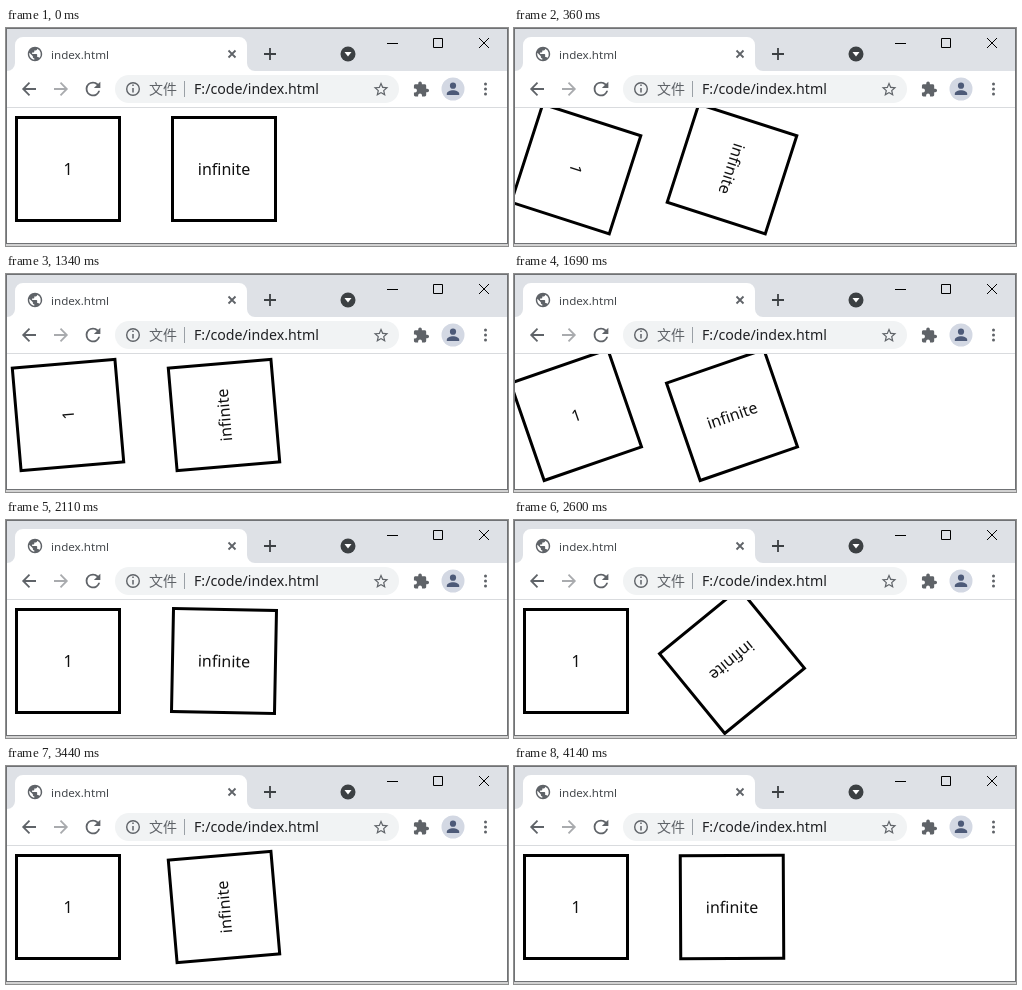
Write an HTML page that moves like this. It is 502 px wide and 218 px high and loops after 4210 ms.

```html
<!DOCTYPE html>
<html lang="zh">
<meta charset="utf-8">
<title>index.html</title>
<style>
  html, body { margin: 0; width: 100%; height: 100%; overflow: hidden; background: #fff; }
  svg { display: block; width: 502px; height: 218px; font-family: "Noto Sans", "Open Sans", sans-serif; }
  .line { fill: none; stroke: #5f6368; stroke-width: 1.8; }
  .thin { fill: none; stroke: #000; stroke-width: 1; }
  .icon { fill: #5f6368; }
  .box rect { fill: #fff; stroke: #000; stroke-width: 3; }
  .box text { font-size: 16px; text-anchor: middle; fill: #111; }
</style>
<svg viewBox="0 0 502 218">
  <defs>
    <clipPath id="page"><rect x="1" y="80" width="500" height="135"/></clipPath>
  </defs>
  <rect width="502" height="218" fill="#d2d2d2"/>
  <rect x=".5" y=".5" width="501" height="215" fill="#fff" stroke="#707275"/>

  <!-- tab strip -->
  <path d="M1 1H501V43H1z" fill="#dee1e6"/>
  <path d="M1 43a8 8 0 0 0 8-8V17a8 8 0 0 1 8-8H233a8 8 0 0 1 8 8V35a8 8 0 0 0 8 8z" fill="#fff"/>
  <path class="icon" transform="translate(29 26) scale(.72) translate(-12 -12)" d="M12 2C6.48 2 2 6.48 2 12s4.48 10 10 10 10-4.48 10-10S17.52 2 12 2zm-1 17.93c-3.95-.49-7-3.85-7-7.93 0-.62.08-1.21.21-1.79L9 15v1c0 1.1.9 2 2 2zm6.9-2.54A2 2 0 0 0 16 16h-1v-3c0-.55-.45-1-1-1H8v-2h2c.55 0 1-.45 1-1V7h2c1.1 0 2-.9 2-2v-.41a8 8 0 0 1 2.9 12.8z"/>
  <text x="45" y="30.5" font-size="11.6" fill="#45494d">index.html</text>
  <path class="line" stroke-width="1.6" d="M222.5 22.5l7 7m0-7l-7 7"/>
  <path class="line" style="stroke:#3c4043" d="M258 26h12m-6-6v12"/>
  <circle cx="342" cy="26" r="7.5" fill="#3c4043"/>
  <path d="M338.5 24h7l-3.5 4.5z" fill="#fff"/>
  <path class="thin" d="M381 15.5h11M427.5 10.5h9v9h-9zM473 10l10 10m0-10l-10 10"/>

  <!-- toolbar -->
  <path class="line" d="M30 61H17.5m6-6.3l-6.3 6.3 6.3 6.3"/>
  <path class="line" style="stroke:#a9abae" d="M48 61h12.5m-6-6.3l6.3 6.3-6.3 6.3"/>
  <path class="icon" transform="translate(87 61) scale(.92) translate(-12 -12)" d="M17.65 6.35A7.96 7.96 0 0 0 12 4a8 8 0 1 0 7.73 10h-2.08A6 6 0 1 1 12 6c1.66 0 3.14.69 4.22 1.78L13 11h7V4z"/>
  <rect x="109" y="47" width="284" height="28" rx="14" fill="#f1f3f4"/>
  <circle class="line" style="stroke-width:1.4" cx="127" cy="61" r="6.3"/>
  <path class="line" style="stroke-width:1.5" d="M127 60v4.5m0-8v1.6"/>
  <text x="143" y="66" font-size="14" fill="#5f6368" style="font-family:'Noto Sans CJK SC','Noto Sans CJK',sans-serif">文件</text>
  <path d="M178.5 53v16" stroke="#9aa0a6"/>
  <text x="188" y="66" font-size="14.2" fill="#202124">F:/code/index.html</text>
  <path class="icon" transform="translate(375 61) scale(.74) translate(-12 -11.5)" d="M22 9.24l-7.19-.62L12 2 9.19 8.63 2 9.24l5.46 4.73L5.82 21 12 17.27 18.18 21l-1.63-7.03zM12 15.4l-3.76 2.27 1-4.28-3.32-2.88 4.38-.38L12 6.1l1.71 4.04 4.38.38-3.32 2.88 1 4.28z"/>
  <path class="icon" transform="translate(415.5 61) scale(.72) translate(-12.5 -11.5)" d="M20.5 11H19V7c0-1.1-.9-2-2-2h-4V3.5a2.5 2.5 0 0 0-5 0V5H4c-1.1 0-2 .9-2 2v3.8h1.5a2.7 2.7 0 0 1 0 5.4H2V20c0 1.1.9 2 2 2h3.8v-1.5a2.7 2.7 0 0 1 5.4 0V22H17c1.1 0 2-.9 2-2v-4h1.5a2.5 2.5 0 0 0 0-5z"/>
  <circle cx="447" cy="61" r="11.5" fill="#d3d8e3"/>
  <g fill="#4d5a78">
    <circle cx="447" cy="57.7" r="3.1"/>
    <path d="M440.8 67v-1.3c0-2.2 3.4-3.5 6.2-3.5s6.2 1.3 6.2 3.5V67z"/>
  </g>
  <g class="icon">
    <circle cx="479.5" cy="56" r="1.5"/><circle cx="479.5" cy="61" r="1.5"/><circle cx="479.5" cy="66" r="1.5"/>
  </g>
  <path d="M1 79.5H501" stroke="#d9dbde"/>

  <g clip-path="url(#page)">
    <g class="box" id="once"><rect x="10.5" y="89.5" width="103" height="103"/><text x="62" y="147">1</text></g>
    <g class="box" id="endless"><rect x="166.5" y="89.5" width="103" height="103"/><text x="218" y="147">infinite</text></g>
  </g>
</svg>
<script>
  const LOOP = 4210, STEP = LOOP / 60, HALF_TURN = LOOP / 4, LEAD = 14;
  const once = document.getElementById('once');
  const endless = document.getElementById('endless');

  // CSS "ease": cubic-bezier(.25, .1, .25, 1)
  function ease(x) {
    let lo = 0, hi = 1, s = 0.5;
    for (let i = 0; i < 24; i++) {
      s = (lo + hi) / 2;
      if (0.75 * s * (1 - s) + s ** 3 < x) lo = s; else hi = s;
    }
    return 0.3 * s * (1 - s) ** 2 + 3 * s * s * (1 - s) + s ** 3;
  }

  const rotate = (box, angle, cx) => box.setAttribute('transform', `rotate(${angle} ${cx} 141)`);

  // Each turn is two eased half turns; the screen updates in fixed steps.
  function draw(time) {
    const step = Math.floor((time % LOOP + 1) / STEP) % 60;
    const halves = step ? (step * STEP + LEAD) / HALF_TURN : 0;
    const angle = 180 * (Math.floor(halves) + ease(halves % 1));
    rotate(once, halves < 2 ? angle : 0, 62);
    rotate(endless, angle, 218);
  }

  const start = performance.now();
  function tick() {
    draw(performance.now() - start);
    requestAnimationFrame(tick);
  }
  tick();
</script>
</html>
```
